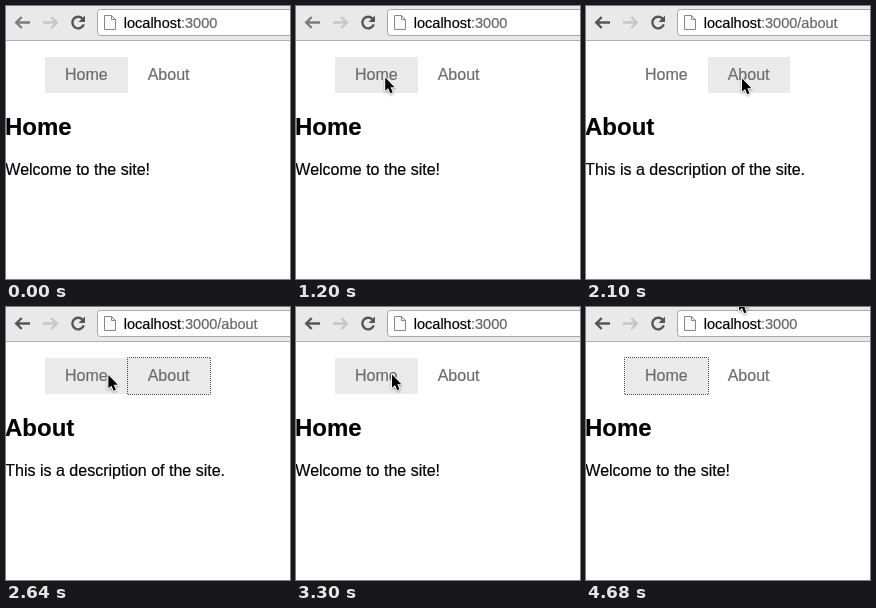
Write an HTML page that moves like this. It is 284 px wide and 273 px high and loops after 5.1 s.

```html
<!DOCTYPE html>
<html lang="en">
<head>
<meta charset="utf-8">
<title>Navigation demo</title>
<style>
html, body { margin: 0; width: 100%; height: 100%; overflow: hidden; background: #fff; }
svg { display: block; width: 284px; height: 273px; }
text {
  font: 16px "Liberation Sans", Arial, sans-serif;
  white-space: pre;
  fill: #000;
  stroke: #000;
  stroke-width: 0.2px;
}
.url { font-size: 14.5px; }
.path { fill: #666; stroke: #666; }
.link { fill: #6c6c6c; stroke: #6c6c6c; }
.title { font-size: 24px; font-weight: bold; }
.icon { fill: none; stroke: #555; stroke-width: 2.4; }
.tab { fill: #eaeaea; }
.ring { fill: none; stroke: #444; stroke-dasharray: 1 1; stroke-dashoffset: 0.5; }
#cursor {
  stroke: #fff;
  stroke-width: 1.8;
  stroke-linejoin: round;
  paint-order: stroke;
  filter: drop-shadow(0 1px 1px rgba(0, 0, 0, 0.35));
}
</style>
</head>
<body>
<svg viewBox="0 0 284 273">
  <rect width="284" height="273" fill="#fff"/>
  <rect width="284" height="34" fill="#e9e9e9"/>
  <rect y="34" width="284" height="1" fill="#b0b0b0"/>

  <path id="back" class="icon" d="M24 16.5H10.5M15.7 11L10.2 16.5L15.7 22"/>
  <path class="icon" style="stroke: #c6c6c6" d="M37 16.5H50.5M45.3 11L50.8 16.5L45.3 22"/>
  <path class="icon" d="M76.4 12.6A5.8 5.8 0 1 0 77.7 18.3"/>
  <path fill="#555" d="M79 9.5V16H72.5Z"/>

  <rect x="91.5" y="3.5" width="210" height="26" rx="3" fill="#fff" stroke="#a6a6a6"/>
  <path d="M98.5 9.5H105.5L109.5 13.5V23.5H98.5Z" fill="#fafafa" stroke="#868686"/>
  <path d="M105.5 9.5V13.5H109.5" fill="none" stroke="#868686"/>
  <text class="url" x="117.8" y="22">localhost<tspan id="path" class="path"></tspan></text>

  <rect id="homeTab" class="tab" x="39" y="51" width="83" height="36"/>
  <rect id="aboutTab" class="tab" x="122" y="51" width="82" height="36"/>
  <text class="link" x="59" y="74">Home</text>
  <text class="link" x="141.7" y="74">About</text>
  <rect id="homeRing" class="ring" x="38.5" y="50.5" width="84" height="37"/>
  <rect id="aboutRing" class="ring" x="121.5" y="50.5" width="83" height="37"/>

  <text id="title" class="title" x="-1" y="129"></text>
  <text id="body" x="-0.7" y="169"></text>

  <path id="cursor" d="M1 0.5V13.8L4 11.1L6.2 16.2L8.5 15.2L6.3 10.2H10.4Z"/>
</svg>
<script>
const LOOP = 5100, STEP = 60;
const $ = id => document.getElementById(id);

const easeOut = power => k => 1 - (1 - k) ** power;
const easeInOut = k => k < 0.5 ? 4 * k ** 3 : 1 - 4 * (1 - k) ** 3;

const home = { path: ":3000", title: "Home", body: "Welcome to the site!" };
const about = { path: ":3000/about", title: "About", body: "This is a description of the site." };

// Each pointer move starts where the previous one ended
const origin = { x: 122, y: -20 };
const moves = [
  { from: 240, to: 720, x: 92, y: 70, ease: easeOut(2) },
  { from: 780, to: 1140, x: 86, y: 71, ease: easeInOut },
  { from: 1140, to: 1440, x: 155, y: 72, ease: easeInOut },
  { from: 2460, to: 2880, x: 95, y: 67, ease: easeOut(4) },
  { from: 4200, to: 4680, x: 152, y: -10, ease: easeInOut }
];

function pointer(t) {
  let { x, y } = origin;
  for (const m of moves) {
    const k = m.ease(Math.min(1, Math.max(0, (t - m.from) / (m.to - m.from))));
    x += (m.x - x) * k;
    y += (m.y - y) * k;
  }
  return { x, y };
}

function show(id, on) {
  $(id).setAttribute("visibility", on ? "visible" : "hidden");
}

function draw(ms) {
  const t = Math.floor((ms % LOOP) / STEP) * STEP;
  const { x, y } = pointer(t);
  const page = t >= 2100 && t < 3300 ? about : home;
  const overHome = x < 122 && y > 50;
  const clicked = t >= 1740;

  $("cursor").setAttribute("transform", `translate(${x} ${y})`);
  $("back").style.stroke = clicked ? "#555" : "#7c7c7c";
  for (const id in page) $(id).textContent = page[id];

  show("homeTab", page === home || overHome);
  show("aboutTab", page === about);
  show("homeRing", page === home && clicked && !overHome);
  show("aboutRing", page === about && overHome);
}

const start = performance.now();
function tick() {
  draw(performance.now() - start);
  requestAnimationFrame(tick);
}
tick();
</script>
</body>
</html>
```
